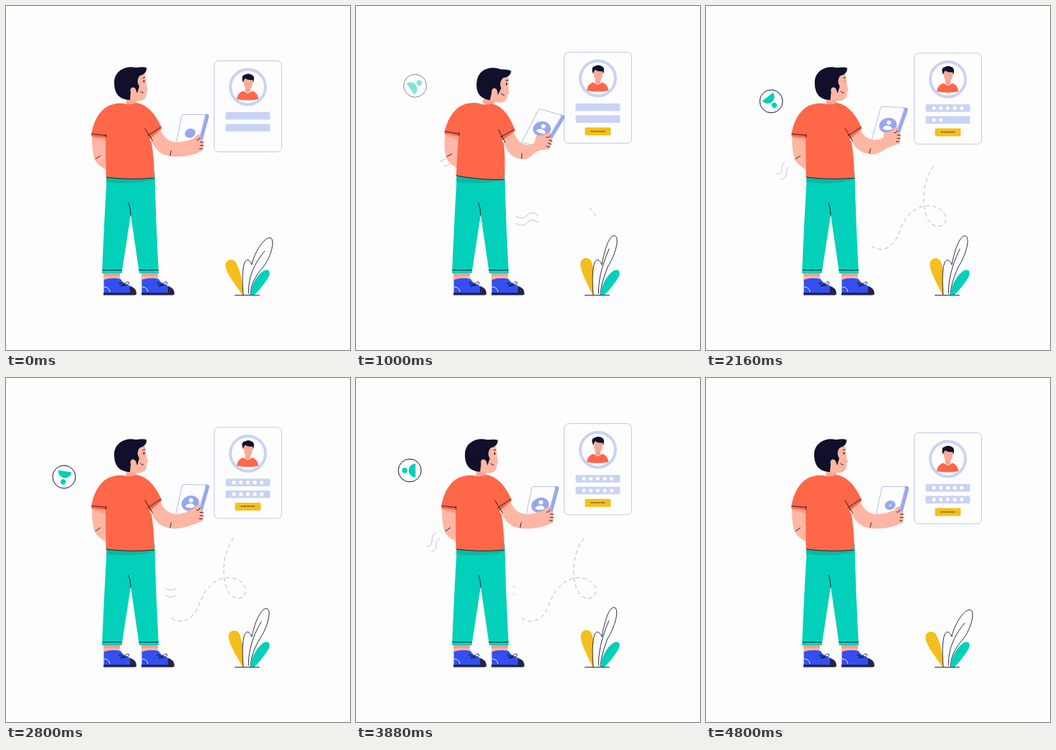
Recreate the animation shown at these times as an HTML page. Size 480 px wide and 480 px high, loop 4.84 s.

```html
<!DOCTYPE html>
<html lang="en">
<head>
<meta charset="utf-8">
<title>Sign-up illustration</title>
<style>
  html, body { margin: 0; width: 100%; height: 100%; overflow: hidden; background: #fdfdfd; }
  svg { display: block; width: 100%; height: 100%; }
  path, line { stroke-linejoin: round; }
  .ink { fill: none; stroke: #16162c; stroke-width: .9; stroke-linecap: round; }
  .wave { fill: none; stroke: #b9c3e4; stroke-width: 1; }
  .skin { fill: #ffb6a3; }
  .shade { fill: #f7a18b; }
  .shirt { fill: #fe6748; }
  .teal { fill: #02d0bb; }
  .dark { fill: #10102b; }
  .sole { fill: #24244a; }
  .pale { fill: #c9d3f3; }
  .blue { fill: #97a7ee; }
  .white { fill: #fdfdfd; }
  .gold { fill: #f4bf1c; }
</style>
</head>
<body>
<svg viewBox="0 0 480 480">
  <defs>
    <path id="trail" pathLength="100" d="M231 335C245 345 262 338 270 315C278 292 290 283 304 279C318 277 333 283 335 296C335 306 325 310 318 306C306 300 303 280 304 262C305 245 312 230 320 220"/>
    <mask id="reveal" maskUnits="userSpaceOnUse" x="0" y="0" width="480" height="480">
      <use href="#trail" id="trailMask" fill="none" stroke="#fff" stroke-width="5"/>
    </mask>
    <g id="shoe">
      <path class="skin" d="M136 373h23v10h-23z"/>
      <path class="shade" d="M136 373h23v4h-23z"/>
      <path fill="#324ff0" d="M136.500 382Q148 378 160 381Q163 387 172 390Q181 393 181.500 400H136.500z"/>
      <path class="sole" d="M173 391.500Q182 393 182 401Q182 403.500 179 403.500H136V400H173z"/>
      <path class="ink" d="M160 391Q165 391 166 387M166 388Q169 383 172 386Q172 389 165 390M165 389Q158 384 158 387Q160 390 165 390"/>
      <path fill="none" stroke="#fff" stroke-width=".9" d="M137 392Q144 392 145 399"/>
    </g>
  </defs>

  <g mask="url(#reveal)">
    <use href="#trail" fill="none" stroke="#b6b8c8" stroke-width="1" stroke-dasharray="2.200 1.500"/>
  </g>
  <g id="leftWaves"></g>
  <g id="rightWaves"></g>

  <g id="badge">
    <circle class="white" r="16" stroke="#16162c"/>
    <g id="badgeIcon" class="teal">
      <path d="M-8 -9.500A9.500 9.500 0 0 1 -8 9.500Z"/>
      <circle cx="7" r="3.700"/>
    </g>
  </g>

  <g id="panel">
    <rect class="white" x="290.500" y=".5" width="94" height="127" rx="6" stroke="#bccbe8"/>
    <circle class="white" cx="337.500" cy="37" r="24.500" stroke="#c9d3f3" stroke-width="4"/>
    <path class="shirt" d="M322 54Q323 45 331 42.500L337.500 46L344 42.500Q351 45 352.500 54Q338 57 322 54Z"/>
    <path class="shade" d="M334 36H341V43Q337.500 47 334 43Z"/>
    <path fill="#f9ab97" d="M332 25H344V33Q343 40 338 41Q333 40 332 33Z"/>
    <path class="dark" d="M331 31Q327 21 333 20Q338 17 343 20Q348 22 345 31L344 27Q338 28 334 25Q332 26 331 31Z"/>
    <rect class="pale" x="306.500" y="72" width="62" height="10.500" rx="1.500"/>
    <rect class="pale" x="306.500" y="88.500" width="62" height="10.500" rx="1.500"/>
    <g id="dots" class="white"></g>
    <g id="button">
      <rect class="gold" x="-18" y="-5.500" width="36" height="11" rx="1.500"/>
      <text y=".9" text-anchor="middle" font-family="Inter, sans-serif" font-weight="500" font-size="2.600" fill="#16162c">REGISTER NOW</text>
    </g>
  </g>

  <path id="yellowLeaf" class="gold" d="M330 403C318 385 306 370 307 360C309 352 319 352 322 358C329 372 331 390 331 403Z"/>
  <path id="bigLeaf" class="ink" style="fill:#fdfdfd"/>
  <path id="vein" class="ink"/>
  <path class="teal" d="M341 403C342 390 350 375 360 369C369 366 370 374 364 382C357 392 352 398 347 403Z"/>
  <path class="ink" d="M319.500 403.500H353.500"/>

  <use href="#shoe"/>
  <use href="#shoe" x="53"/>
  <path class="teal" d="M141 232H207.500Q209 300 213 373H186L174 291L161.500 373H134Q137 300 141 232Z"/>
  <path fill="#06b9a2" d="M140.500 234H207V242Q180 250 140 246Z"/>
  <path class="ink" d="M135 368.500H161M185.500 368.500H212.500M171 275Q174 282 174 292"/>

  <g id="torso">
    <path class="skin" d="M120 182H141V229C131 224 124 219 122 208C120 200 120 190 120 182Z"/>
    <path class="shade" d="M120 182L139 184V189Q128 187 120 184Z"/>
    <path class="ink" d="M125 213.500L131.500 209"/>
  </g>
  <g id="phone">
    <path class="blue" d="M276 151H280Q284 151 283 155L273 192L263 200Z"/>
    <path class="white" stroke="#b4c0ee" d="M248 151.500H276Q278.500 151.500 278 154L265 203H235L245 154Q245.500 151.500 248 151.500Z"/>
    <g id="phoneIcon">
      <ellipse class="blue" rx="12.500" ry="10.500" transform="rotate(-20)"/>
      <g id="phonePerson" class="white">
        <circle cx="1" cy="-4" r="3"/>
        <path d="M-7 5Q-6 .5 0 .5Q6 .5 6 5Q0 8 -7 5Z"/>
      </g>
    </g>
  </g>
  <path id="arm" class="skin"/>
  <path id="elbow" class="ink"/>
  <g id="hand">
    <path class="skin" d="M252 189L262 185Q264 181 269 179Q272 180 270 185L274 187Q277 190 275 193Q277 196 275 198Q276 202 272 203L262 207L252 208Z"/>
    <path class="ink" d="M266 187Q270 188 270 184M271 190H275M271 194.500H275M270 199H274"/>
  </g>
  <path id="neck" fill="none" stroke="#f8a893" stroke-width="14"/>
  <g id="shirt">
    <path class="shirt" d="M164 136Q173 139 182 135C198 138 209 151 217.500 171L200 186L203 190Q207 215 207 240Q172 243 139.500 239L139 184L119 182C121 160 133 140 150 137Q157 135 164 136Z"/>
    <path class="ink" d="M119.500 178.500L139 180.500M198 181L216 169M139.500 183V179M194 171L204.500 188M140 239Q172 243 207 240"/>
  </g>
  <g id="head">
    <path class="skin" d="M173 112L186 93L194 95C195 100 196 106 196 111L198 117Q198 119 196 119C197 126 194 131 188 132C182 133 177 132 173 130Z"/>
    <path class="dark" d="M196 86C190 84 182 87 178 85.500C164 84 151 92 151 107C151 122 158 131 173 131L174 120C172 114 178 111 181 116L183 122L186 112C182 106 184 100 187 97C193 96 197 91 196 86Z"/>
    <ellipse id="eye" class="dark" cx="192.500" cy="105" rx=".9"/>
    <path class="ink" d="M191 100.500L194 99.500M187.500 119Q188.500 121.500 191.500 121"/>
  </g>
</svg>
<script>
const LOOP = 4840, SWAY = LOOP / 3;
const $ = id => document.getElementById(id);
const set = (id, name, value) => $(id).setAttribute(name, value);
const move = (id, value) => set(id, 'transform', value);
const trim = (el, from, to) =>
  el.setAttribute('stroke-dasharray', `0 ${from} ${Math.max(0, to - from)} 300`);

// Eased interpolation through rows of [time, ...values].
function at(t, keys) {
  const i = keys.findIndex(k => k[0] > t);
  if (i === 0) return keys[0].slice(1);
  if (i < 0) return keys[keys.length - 1].slice(1);
  const a = keys[i - 1], b = keys[i];
  const u = (1 - Math.cos(Math.PI * (t - a[0]) / (b[0] - a[0]))) / 2;
  return a.slice(1).map((v, j) => v + (b[j + 1] - v) * u);
}

// lean, hand x, hand y, hand angle, elbow x, elbow y
const POSE = [
  [450, 0, 0, 0, 0, 0, 0], [920, 1, -1.5, -3, 16, 2, 4], [1720, 1, -1, -1, 14, 2, 4],
  [2170, .04, -4, -10, 4, -1, -3], [2800, 0, 0, -2.5, 1, 0, 0], [3300, 0, 0, 0, 0, 0, 0]
];
const BADGE = [
  [700, 82, 108], [1000, 82.5, 111.3], [1720, 92, 125], [2160, 91, 133],
  [2800, 81, 138], [3400, 75, 135], [3880, 75, 129], [4560, 84, 118]
];

function addWaves(id, d, dx, dy) {
  $(id).innerHTML = [0, 1].map(i =>
    `<path class="wave" pathLength="100" d="${d}" transform="translate(${dx * i} ${dy * i})"/>`).join('');
}
addWaves('leftWaves', 'M98 234C105 236 106 231 106 226C106 219 111 215 115 216C119 218 122 214 126 213', 6, 7);
addWaves('rightWaves', 'M219 290C227 298 234 297 239 292C244 287 250 288 255 293', 0, 10);
$('dots').innerHTML = Array.from({ length: 10 }, (_, i) =>
  `<circle cx="${318 + i % 5 * 9.7}" cy="${i < 5 ? 77.3 : 93.8}" r="2.6"/>`).join('');

function drawMan(t) {
  const [lean, hx, hy, angle, ex, ey] = at(t, POSE);
  const tilt = `rotate(${4 * lean} 173 240)`;
  move('torso', tilt);
  move('shirt', tilt);

  const [nod] = at(t, [[3500, 0], [3880, 2], [4300, 0]]);
  move('head', `translate(${13 * lean} ${1.5 * lean}) rotate(${9 * lean + nod} 180 135)`);
  set('neck', 'd', `M${174 + 7 * lean} 138L${176 + 14 * lean} ${125 + 3 * lean}`);
  set('eye', 'ry', at(t, [[2060, 1.8], [2140, .3], [2190, .3], [2270, 1.8]])[0]);

  const rad = angle * Math.PI / 180, c = Math.cos(rad), s = Math.sin(rad);
  const shoulder = (x, y) => `${x + 4.5 * lean} ${y + 2.5 * lean}`;
  const elbow = (x, y) => `${x + ex} ${y + ey}`;
  const wrist = (x, y) =>
    `${270 + hx + (x - 270) * c - (y - 190) * s} ${190 + hy + (x - 270) * s + (y - 190) * c}`;
  set('arm', 'd', `M${shoulder(214, 170)}C${shoulder(219, 182)} ${elbow(226, 189)} ${elbow(237, 190)}` +
    `Q${elbow(248, 190)} ${wrist(263, 184.5)}L${wrist(266, 205)}` +
    `C${wrist(254, 210)} ${elbow(242, 211)} ${elbow(231, 210)}` +
    `C${elbow(217, 208)} ${elbow(209, 203)} ${shoulder(201, 184)}Z`);
  set('elbow', 'd', `M${elbow(229, 208.5)}L${elbow(230.5 - lean, 202)}`);
  const grip = `translate(${hx} ${hy}) rotate(${angle} 270 190)`;
  move('phone', grip);
  move('hand', grip);

  const [icon, person] = at(t, [[0, .6, 0], [450, 1, 1], [4600, 1, 1], [4840, .58, .4]]);
  move('phoneIcon', `translate(257 177.500) scale(${icon})`);
  move('phonePerson', `scale(${person})`);
}

function drawPlant(swing) {
  const x = value => value - 9 * swing, y = value => value - 3.5 * swing;
  set('bigLeaf', 'd', 'M331 403C330 390 329 368 333 358C336 352 340 354 343 361' +
    `C346 345 ${x(360)} ${y(322)} ${x(369)} ${y(323.5)}` +
    `C${x(376)} ${y(326)} ${x(370)} ${y(350)} ${x(359)} 364C345 380 342 390 341 403`);
  set('vein', 'd', `M338.5 401C338 385 342 364 ${x(361)} ${y(342)}`);
  move('yellowLeaf', `rotate(${11 * swing - 1} 331 403)`);
}

function drawScene(t) {
  const phase = t / SWAY % 1, swing = (1 - Math.cos(2 * Math.PI * phase)) / 2;
  move('panel', `translate(0 ${76 - 14 * swing})`);
  drawPlant(swing);

  move('button', `translate(337.500 111) scale(${at(t, [[500, 0], [800, 1]])[0]})`);
  [...$('dots').children].forEach((dot, i) =>
    dot.setAttribute('visibility', t >= 1470 + 110 * i ? 'visible' : 'hidden'));

  const [x, y] = at(t, BADGE);
  move('badge', `translate(${x} ${y})`);
  set('badge', 'opacity', at(t, [[850, 0], [1150, 1], [4480, 1], [4760, 0]])[0]);
  move('badgeIcon', `rotate(${t / LOOP * 360 - 108.6})`);

  const spread = Math.min(50, Math.max(0, (t - 915) * .0415)) * at(t, [[4150, 1], [4650, 0]])[0];
  trim($('trailMask'), 50 - spread, 50 + spread);

  const left = at(phase, [[.1, 0, 0], [.34, 0, 58], [.42, 3, 62], [.6, 70, 100], [.68, 100, 100]]);
  const right = at(phase, [[.37, 0, 0], [.405, 0, 10], [.62, 12, 100], [.736, 8, 52], [.85, 0, 0]]);
  for (const wave of $('leftWaves').children) trim(wave, ...left);
  for (const wave of $('rightWaves').children) trim(wave, ...right);
}

function frame(now) {
  const t = now % LOOP;
  drawScene(t);
  drawMan(t);
  requestAnimationFrame(frame);
}
frame(performance.now());
</script>
</body>
</html>
```
